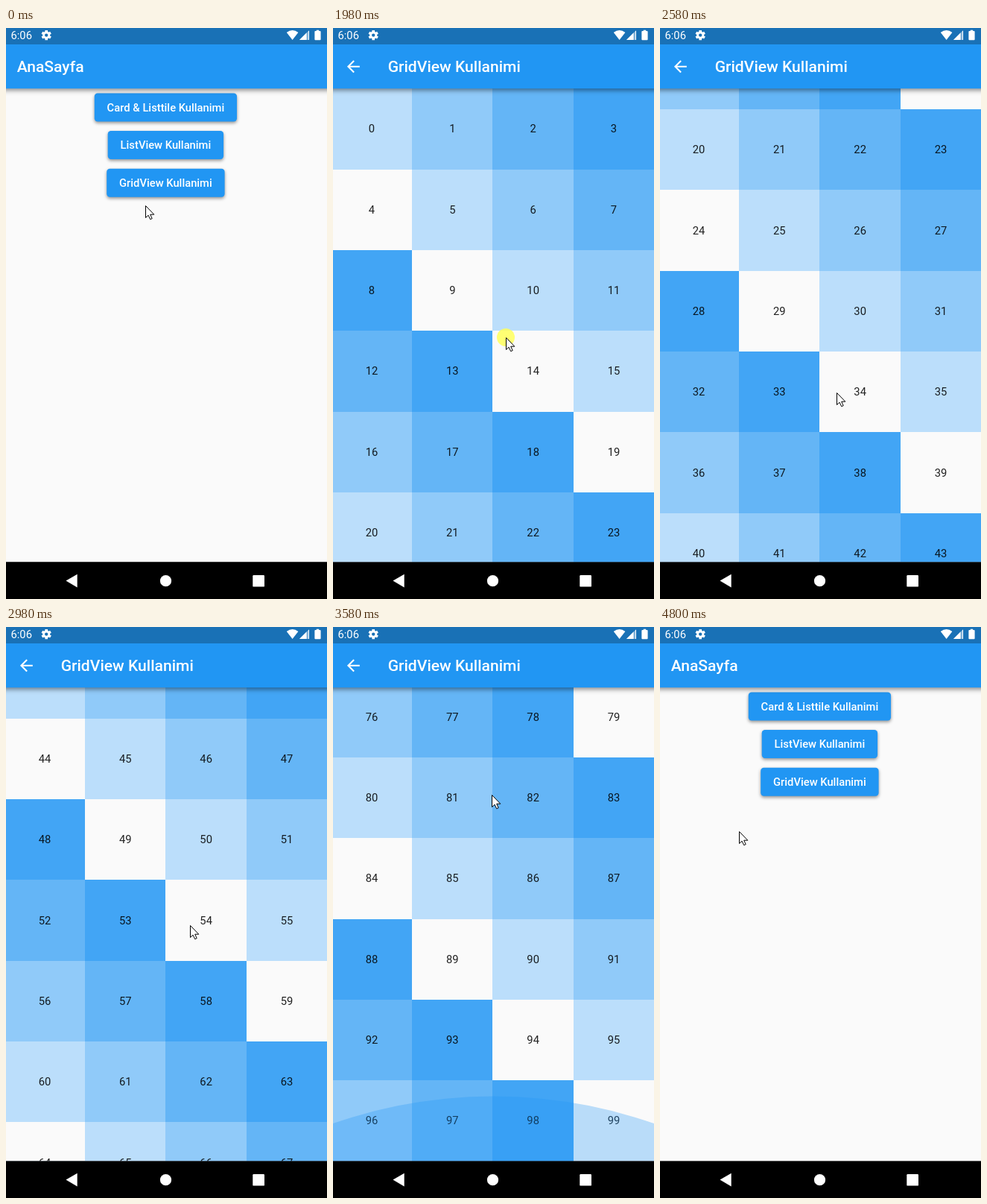
Write an HTML page with a canvas that moves like this. It is 431 px wide and 766 px high and loops after 5 s.

```html
<!DOCTYPE html>
<html lang="tr">
<head>
<meta charset="utf-8">
<title>GridView</title>
<style>
  html, body { margin: 0; width: 100%; height: 100%; overflow: hidden; background: #000; }
  canvas { display: block; width: 431px; height: 766px; }
</style>
</head>
<body>
<canvas id="stage" width="431" height="766"></canvas>
<script>
const ctx = document.getElementById('stage').getContext('2d');
const W = 431, VIEW_H = 716.5, LOOP = 5000;
const DP = 1.054, LEFT = -2.2, CENTER_X = 214.4;
const STATUS_H = 22, BAR_BOTTOM = 81.2, CELL = 108.33;
const END_SCROLL = 25 * CELL - (VIEW_H - BAR_BOTTOM);
const BLUE = '#2196f3', PAPER = '#fafafa';
const SHADES = ['#bbdefb', '#90caf9', '#64b5f6', '#42a5f5', PAPER];
const BUTTONS = ['Card & Listtile Kullanimi', 'ListView Kullanimi', 'GridView Kullanimi'];

const STEPS = [
  [0, 'home', 187, 238],
  [200, 'home', 205, 212],
  [1180, 'tap', 205, 212],
  [1380, 'open', 205, 212, 0],
  [1580, 'grid', 217, 272, 0],
  [1780, 'grid', 238, 431, 0],
  [1980, 'grid', 232, 415, 0, true],
  [2180, 'grid', 228, 290, 150],
  [2380, 'grid', 232, 390, 410],
  [2580, 'grid', 237, 489, 513.8],
  [2780, 'grid', 240, 340, 690],
  [2980, 'grid', 247, 400, 1150],
  [3180, 'grid', 253, 512, 1427.3],
  [3380, 'grid', 222, 300, END_SCROLL - 10],
  [3580, 'grid', 213, 225, END_SCROLL],
  [3980, 'grid', 56, 94, END_SCROLL],
  [4200, 'grid', 22, 59, END_SCROLL],
  [4400, 'grid', 21, 59, END_SCROLL],
  [4600, 'close', 21, 59, END_SCROLL],
  [4800, 'home', 106, 274]
];

function text(str, x, centerY, sizeDp, weight, color, align = 'left') {
  const size = sizeDp * DP;
  ctx.font = `${weight} ${size}px Roboto, sans-serif`;
  ctx.textAlign = align;
  ctx.fillStyle = color;
  ctx.fillText(str, x, centerY + size * 0.342);
}

function polygon(points, color) {
  ctx.beginPath();
  points.forEach(([x, y]) => ctx.lineTo(x, y));
  ctx.closePath();
  ctx.fillStyle = color;
  ctx.fill();
}

function disc(x, y, r, color) {
  ctx.beginPath();
  ctx.arc(x, y, r, 0, Math.PI * 2);
  ctx.fillStyle = color;
  ctx.fill();
}

function shadow(alpha, blur, dy) {
  ctx.shadowColor = `rgba(0,0,0,${alpha})`;
  ctx.shadowBlur = blur;
  ctx.shadowOffsetY = dy;
}

function appBar(title, titleX) {
  ctx.save();
  shadow(0.42, 6, 2.5);
  ctx.fillStyle = BLUE;
  ctx.fillRect(-10, 0, W + 20, BAR_BOTTOM);
  ctx.restore();
  text(title, titleX, 51.7, 20, 500, '#fff');
}

function button(label, cy, tapped) {
  const h = 36 * DP;
  ctx.font = `500 ${14 * DP}px Roboto, sans-serif`;
  const w = ctx.measureText(label).width + 32 * DP;
  ctx.save();
  ctx.beginPath();
  ctx.roundRect(CENTER_X - w / 2, cy - h / 2, w, h, 4.2);
  shadow(0.42, tapped ? 5 : 4, tapped ? 2.5 : 2);
  ctx.fillStyle = BLUE;
  ctx.fill();
  shadow(0, 0, 0);
  if (tapped) {
    ctx.clip();
    disc(206, 212, 25, 'rgba(255,255,255,.08)');
  }
  ctx.restore();
  text(label, CENTER_X, cy, 14, 500, '#fff', 'center');
}

function homePage(tapped) {
  ctx.fillStyle = PAPER;
  ctx.fillRect(0, 0, W, VIEW_H);
  BUTTONS.forEach((label, i) => button(label, 106.5 + i * 48 * DP, tapped && i === 2));
  appBar('AnaSayfa', 14.7);
}

function cells(scroll) {
  const first = Math.floor(scroll / CELL);
  for (let row = first; row < Math.min(25, first + 7); row++) {
    const top = BAR_BOTTOM + row * CELL - scroll;
    const y = Math.round(top), bottom = Math.round(top + CELL);
    for (let col = 0; col < 4; col++) {
      const index = row * 4 + col, left = LEFT + col * CELL;
      const x = Math.round(left);
      ctx.fillStyle = SHADES[index % 5];
      ctx.fillRect(x, y, Math.round(left + CELL) - x, bottom - y);
      text(String(index), left + CELL / 2, top + CELL / 2, 14, 400, 'rgba(0,0,0,.87)', 'center');
    }
  }
}

function overscrollGlow(height, alpha) {
  const r = 654;
  disc(W / 2, VIEW_H - height + r, r, `rgba(33,150,243,${alpha})`);
}

function backArrow() {
  ctx.save();
  ctx.translate(27.4, 51.7);
  ctx.scale(DP, DP);
  ctx.beginPath();
  ctx.moveTo(8, 0);
  ctx.lineTo(-6.6, 0);
  ctx.moveTo(0.7, -7.3);
  ctx.lineTo(-6.6, 0);
  ctx.lineTo(0.7, 7.3);
  ctx.strokeStyle = '#fff';
  ctx.lineWidth = 2;
  ctx.stroke();
  ctx.restore();
}

function gridPage(scroll, time) {
  ctx.save();
  ctx.beginPath();
  ctx.rect(0, 0, W, VIEW_H);
  ctx.clip();
  ctx.fillStyle = PAPER;
  ctx.fillRect(0, 0, W, VIEW_H);
  cells(scroll);
  if (time >= 3580 && time < 3780) overscrollGlow(87, 0.3);
  else if (time >= 3780 && time < 3980) overscrollGlow(60, 0.1);
  appBar('GridView Kullanimi', 73.7);
  backArrow();
  ctx.restore();
}

function zoomed(scale, alpha, paint) {
  ctx.save();
  ctx.translate(W / 2, VIEW_H / 2);
  ctx.scale(scale, scale);
  ctx.translate(-W / 2, -VIEW_H / 2);
  ctx.globalAlpha = alpha;
  paint();
  ctx.restore();
}

function gear(x, y) {
  ctx.save();
  ctx.translate(x, y);
  ctx.fillStyle = '#fff';
  for (let i = 0; i < 6; i++) {
    ctx.rotate(Math.PI / 3);
    ctx.fillRect(-1.8, -6.7, 3.6, 4);
  }
  ctx.beginPath();
  ctx.arc(0, 0, 5, 0, Math.PI * 2);
  ctx.arc(0, 0, 2.2, 0, Math.PI * 2, true);
  ctx.fill();
  ctx.restore();
}

function statusBar() {
  ctx.fillStyle = 'rgba(0,0,0,.25)';
  ctx.fillRect(0, 0, W, STATUS_H);
  text('6:06', 6.5, 10.3, 14, 400, '#fff');
  gear(54.2, 9.6);

  ctx.beginPath();
  ctx.moveTo(384.6, 16);
  ctx.lineTo(376.8, 6);
  ctx.quadraticCurveTo(384.6, -0.2, 392.4, 6);
  ctx.closePath();
  ctx.fillStyle = '#fff';
  ctx.fill();

  polygon([[394, 16], [407, 16], [407, 3]], 'rgba(255,255,255,.45)');
  polygon([[394, 16], [403.5, 16], [403.5, 6.5]], '#fff');
  ctx.fillStyle = '#fff';
  ctx.fillRect(406, 4, 1, 12);

  ctx.beginPath();
  ctx.roundRect(414.4, 4, 8.2, 12.2, 1);
  ctx.rect(416.8, 2.7, 3.4, 1.5);
  ctx.fill();
}

function navigationBar() {
  ctx.fillStyle = '#000';
  ctx.fillRect(0, VIEW_H, W, 766 - VIEW_H);
  polygon([[80.5, 741.6], [95.7, 732.8], [95.7, 750.4]], '#fff');
  disc(214.5, 741.7, 7.6, '#fff');
  ctx.beginPath();
  ctx.roundRect(331.3, 734, 15.7, 15.6, 1.2);
  ctx.fill();
}

function cursor(x, y, pressed) {
  if (pressed) disc(x, y, 12, 'rgba(255,255,90,.85)');
  ctx.save();
  ctx.translate(x + 0.5, y + 0.5);
  polygon([[0, 0], [0, 16], [3.6, 12.7], [6.2, 18.2], [8.7, 17.1], [6.2, 11.7], [11.3, 11.7]], '#fff');
  ctx.strokeStyle = '#000';
  ctx.lineWidth = 1;
  ctx.stroke();
  ctx.restore();
}

function render(time) {
  const [, scene, x, y, scroll, pressed] = STEPS.findLast(step => step[0] <= time);
  const grid = () => gridPage(scroll, time);
  if (scene === 'grid') {
    grid();
  } else if (scene === 'open') {
    zoomed(1.03, 1, () => homePage(false));
    ctx.fillStyle = 'rgba(0,0,0,.6)';
    ctx.fillRect(0, 0, W, VIEW_H);
    zoomed(0.96, 1, grid);
  } else if (scene === 'close') {
    zoomed(1.01, 1, () => homePage(false));
    zoomed(1, 0.02, grid);
  } else {
    homePage(scene === 'tap');
  }
  statusBar();
  navigationBar();
  cursor(x, y, pressed);
}

let start;
function tick(now) {
  start ??= now;
  render((now - start) % LOOP);
  requestAnimationFrame(tick);
}
requestAnimationFrame(tick);
</script>
</body>
</html>
```
